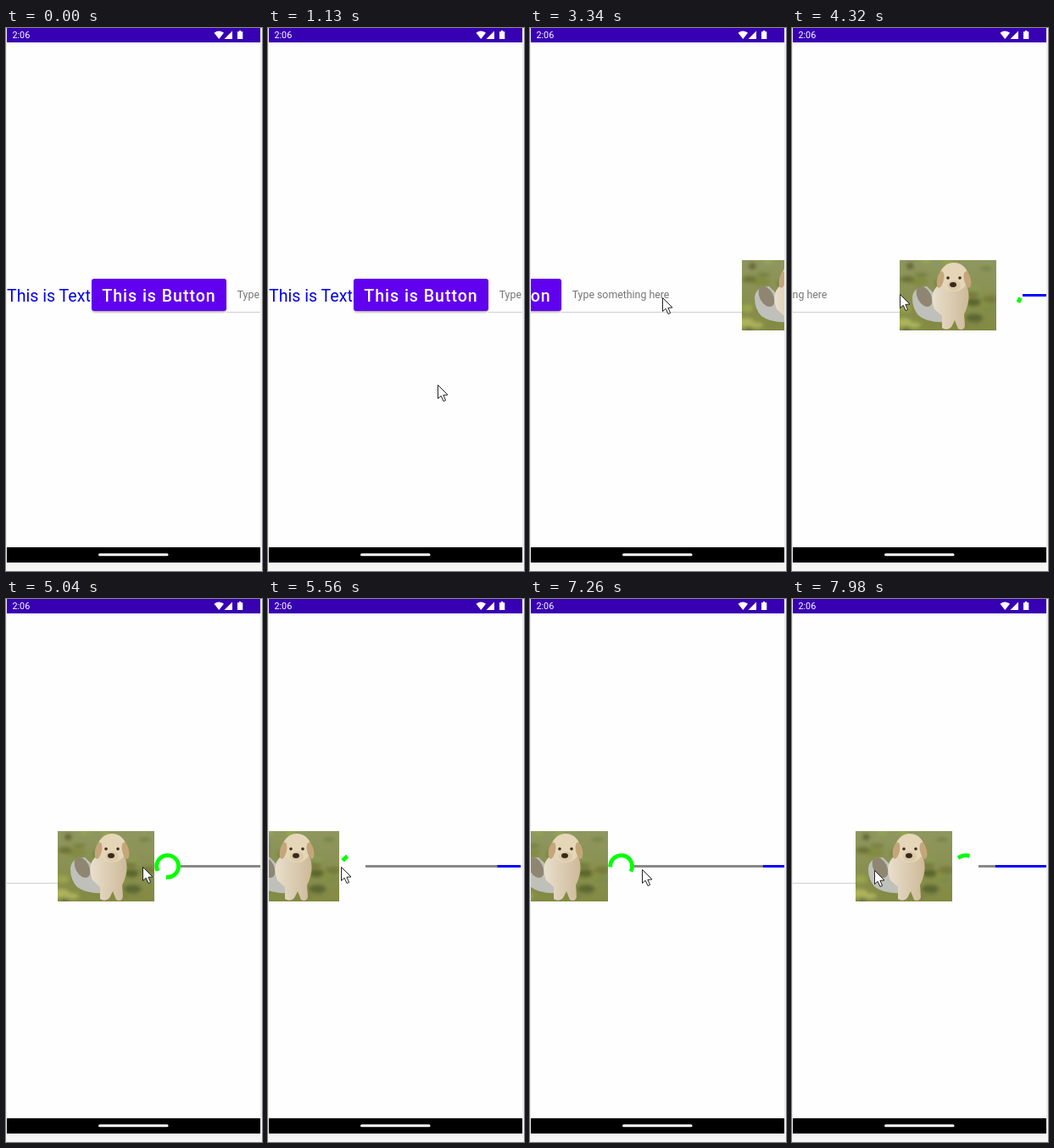
Animation of 302x641 px, one loop 8000 ms. Source, as an HTML page:

```html
<!DOCTYPE html>
<html lang="en">
<head>
<meta charset="utf-8">
<title>Horizontal scroll demo</title>
<style>
  html, body { margin: 0; width: 100%; height: 100%; overflow: hidden; background: #f5f5f5; }
  svg { display: block; width: 302px; height: 641px; }
  text { font-family: Roboto, "Liberation Sans", sans-serif; white-space: pre; }
</style>
</head>
<body>
<svg viewBox="0 0 302 641" xmlns="http://www.w3.org/2000/svg">
  <defs>
    <clipPath id="screen"><rect x="1" y="17" width="299" height="596"/></clipPath>
    <clipPath id="photoClip"><rect width="114" height="83"/></clipPath>
    <linearGradient id="grass" x1="0" y1="0" x2="0" y2="1">
      <stop offset="0" stop-color="#8f9760"/>
      <stop offset="1" stop-color="#838a42"/>
    </linearGradient>
    <linearGradient id="fur" x1="0" y1="0" x2="1" y2="0">
      <stop offset="0" stop-color="#e9dfcc"/>
      <stop offset="1" stop-color="#cdb998"/>
    </linearGradient>
    <filter id="soft"><feGaussianBlur stdDeviation="2"/></filter>
    <filter id="shade" x="-10%" y="-20%" width="120%" height="150%"><feGaussianBlur stdDeviation="1"/></filter>
  </defs>

  <rect width="302" height="641" fill="#f5f5f5"/>
  <rect width="302" height="631" fill="#ebebeb"/>
  <rect x="1" width="299" height="631" fill="#fefefe"/>

  <g clip-path="url(#screen)">
    <g id="row">
      <text x="1" y="323" font-size="19.6" fill="#0000e6">This is Text</text>

      <rect x="101.5" y="297.5" width="158" height="38" rx="3" fill="#000" opacity=".35" filter="url(#shade)"/>
      <rect x="101" y="296" width="159" height="38" rx="3" fill="#6000ee"/>
      <text x="113.3" y="323" font-size="19.6" font-weight="500" letter-spacing=".96" fill="#fff">This is Button</text>

      <text x="272.7" y="319" font-size="12.35" fill="#757575">Type something here</text>
      <rect x="260" y="335" width="213" height="1" fill="#cfcfcf"/>

      <g transform="translate(473 274)" clip-path="url(#photoClip)">
        <rect width="114" height="83" fill="url(#grass)"/>
        <g id="patches" filter="url(#soft)"/>
        <!-- bowl -->
        <path d="M15 45 Q15 32 32 31 L62 60 L64 72 Q36 76 23 66 Q15 58 15 45Z" fill="#bfc0ba"/>
        <ellipse cx="29" cy="43" rx="8" ry="13" transform="rotate(-28 29 43)" fill="#8f8672"/>
        <!-- puppy -->
        <path d="M48 28 Q33 38 41 58 L50 66 L50 80 Q56 84 61 79 L65 71 L69 81 Q75 84 77 78 L76 64 Q86 44 78 28Z" fill="url(#fur)"/>
        <ellipse cx="64" cy="20" rx="17" ry="17" fill="#e6d6b8"/>
        <ellipse cx="48" cy="23" rx="4" ry="10" transform="rotate(12 48 23)" fill="#c4a67a"/>
        <ellipse cx="80" cy="23" rx="4" ry="10" transform="rotate(-12 80 23)" fill="#c4a67a"/>
        <ellipse cx="64" cy="30" rx="8" ry="6" fill="#dccaa8"/>
        <g fill="#36291f">
          <circle cx="57" cy="21" r="1.8"/>
          <circle cx="71" cy="21" r="1.8"/>
          <ellipse cx="63" cy="29" rx="4" ry="3"/>
        </g>
      </g>

      <path id="ring" fill="none" stroke="#0f0" stroke-width="4.8" stroke-linecap="square"/>
      <rect x="618" y="314" width="183" height="3" fill="#888"/>
      <rect class="dash" y="314" height="3" fill="#00f"/>
      <rect class="dash" y="314" height="3" fill="#00f"/>
    </g>
  </g>

  <rect x="1" width="299" height="17" fill="#3700b3"/>
  <text x="7.4" y="12.2" font-size="10.8" fill="#fff">2:06</text>
  <g fill="#fff">
    <path d="M245.5 5.8 Q251.3 1 257 5.8 L251.3 13Z"/>
    <path d="M267 3.5 V13 H257.5Z"/>
    <path d="M273 4.2 H275 V3 H277.3 V4.2 H279.3 V13 H273Z"/>
  </g>
  <rect x="1" y="613" width="299" height="18" fill="#000"/>
  <rect x="109" y="620.2" width="82.5" height="3" rx="1.5" fill="#fff"/>

  <path id="pointer" d="M0 0 V16 L3.7 12.8 L6.5 19 L9.1 18 L6.4 11.9 L11.5 11.5Z"
        fill="#fff" stroke="#222" stroke-width="1" stroke-linejoin="round"/>
</svg>

<script>
const LOOP = 8000, FIRST = 650, FRAME = 122.16;
const MAX_SCROLL = 503, BAR = { x: 618, width: 183 };
const RING = { x: 602.6, y: 315.5, r: 12.9 };

const $ = id => document.getElementById(id);
const row = $('row'), ring = $('ring'), pointer = $('pointer');
const dashes = document.querySelectorAll('.dash');

// The row follows the pointer while it is dragged.
const drags = [
  { start: 1420, end: 2140, from: 194, to: 25, y: 314 },
  { start: 2980, end: 3700, from: 210, to: 102, y: 318 },
  { start: 4060, end: 4560, from: 196, to: 61, y: 314 },
  { start: 5040, end: 5440, from: 178, to: 86, y: 316 },
  { start: 7217, end: 7500, from: 124, to: 196, y: 319 },
  { start: 7860, end: 7980, from: 64, to: 97, y: 320 }
];

const clamp = (x, lo = 0, hi = 1) => Math.min(hi, Math.max(lo, x));
const mix = (a, b, k) => a + (b - a) * k;
const smooth = k => k * k * (3 - 2 * k);

function bezier(x1, y1, x2, y2) {
  const at = (a, b, u) => 3 * a * u * (1 - u) ** 2 + 3 * b * u * u * (1 - u) + u ** 3;
  return x => {
    let lo = 0, hi = 1;
    for (let i = 0; i < 24; i++) {
      const mid = (lo + hi) / 2;
      if (at(x1, x2, mid) < clamp(x)) lo = mid; else hi = mid;
    }
    return at(y1, y2, lo);
  };
}

function drawPatches() {
  let seed = 7;
  const random = () => (seed = seed * 16807 % 2147483647) / 2147483647;
  let shapes = '';
  for (let i = 0; i < 36; i++) {
    const tone = `hsl(${62 + random() * 16} ${28 + random() * 12}% ${28 + random() * 28}%)`;
    shapes += `<ellipse cx="${random() * 114}" cy="${random() * 83}" rx="${4 + random() * 7}"
      ry="${2 + random() * 3}" fill="${tone}"/>`;
  }
  $('patches').innerHTML = shapes;
}

function pose(t) {
  let scroll = 0, last = { end: FIRST, to: 206, y: 514 };
  for (const drag of drags) {
    if (t < drag.start) {
      const k = smooth(clamp((t - last.end) / (drag.start - last.end)));
      return { scroll, x: mix(last.to, drag.from, k), y: mix(last.y, drag.y, k) };
    }
    const x = mix(drag.from, drag.to, clamp((t - drag.start) / (drag.end - drag.start)));
    scroll = clamp(scroll + drag.from - x, 0, MAX_SCROLL);
    if (t <= drag.end) return { scroll, x, y: drag.y };
    last = drag;
  }
  return { scroll, x: last.to, y: last.y };
}

const turnEase = bezier(.4, 0, .2, 1);
const edge = (delay, span, ...curve) => {
  const ease = bezier(...curve);
  return t => ease((t - delay) / span);
};
const dashEdges = [
  { head: edge(0, 750, .2, 0, .8, 1), tail: edge(333, 850, .4, 0, 1, 1) },
  { head: edge(1000, 567, 0, 0, .65, 1), tail: edge(1267, 533, .1, 0, .45, 1) }
];

function drawBar(time) {
  dashEdges.forEach(({ head, tail }, i) => {
    const from = tail(time % 1800), to = head(time % 1800);
    dashes[i].setAttribute('x', BAR.x + BAR.width * from);
    dashes[i].setAttribute('width', BAR.width * Math.max(0, to - from));
  });
}

function drawRing(time) {
  const cycles = time / 1332, turn = Math.floor(cycles), part = cycles - turn;
  const tail = 290 * turnEase(part * 2 - 1);
  const sweep = Math.max(.5, 290 * turnEase(part * 2) - tail);
  const start = tail + 286 * part + 216 * (turn + 4) - 90;
  const point = deg => {
    const a = deg * Math.PI / 180;
    return `${RING.x + RING.r * Math.cos(a)} ${RING.y + RING.r * Math.sin(a)}`;
  };
  ring.setAttribute('d', `M${point(start)} A${RING.r} ${RING.r} 0 ${+(sweep > 180)} 1 ${point(start + sweep)}`);
}

function draw(now) {
  const frame = Math.floor((now - FIRST) / FRAME);
  const t = frame < 0 ? 0 : FIRST + frame * FRAME;
  const { scroll, x, y } = pose(t);
  row.setAttribute('transform', `translate(${-Math.round(scroll)} 0)`);
  pointer.setAttribute('transform', `translate(${Math.round(x) + .5} ${Math.round(y) + .5})`);
  pointer.setAttribute('visibility', frame < 0 ? 'hidden' : 'visible');
  const time = t * 1.045;
  drawBar(time + 1219);
  drawRing(time + 2034);
}

drawPatches();
const begin = performance.now();
function loop() {
  draw((performance.now() - begin) % LOOP);
  requestAnimationFrame(loop);
}
loop();
</script>
</body>
</html>
```
